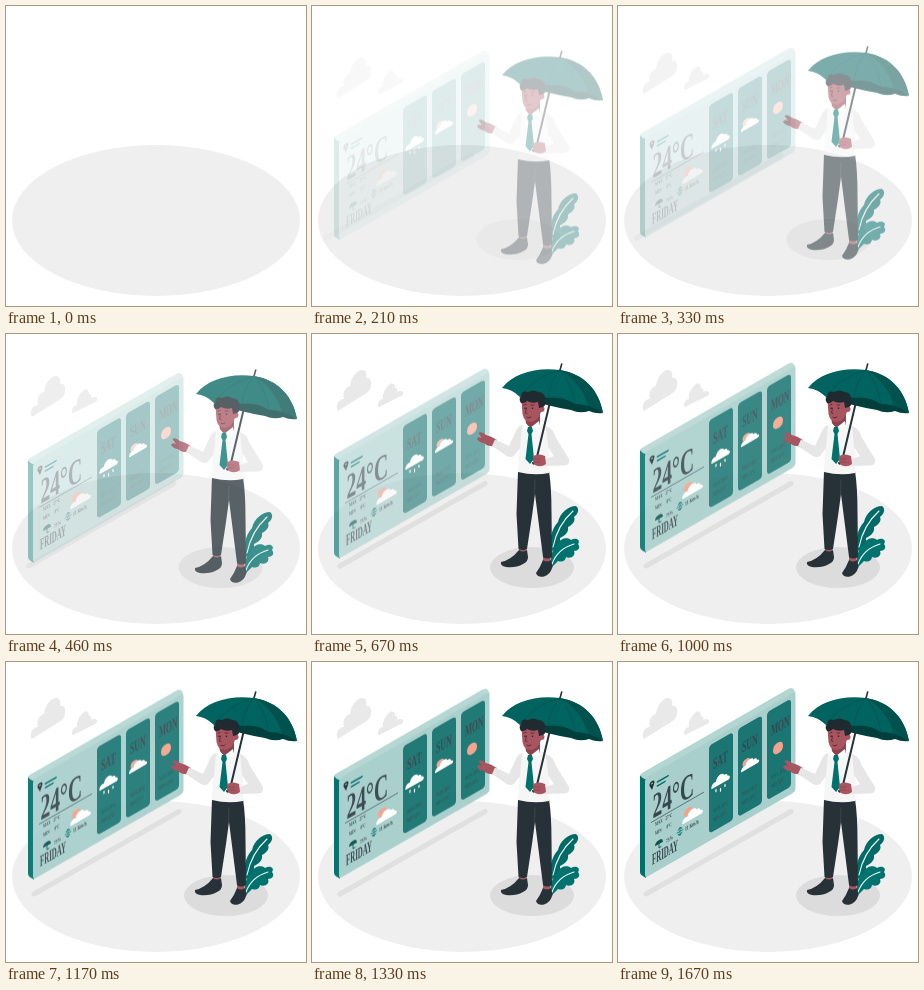
These frames come from a looping animation (300 px wide and 300 px high, 1710 ms). An HTML page:

```html
<!DOCTYPE html>
<html lang="en">
<head>
<meta charset="utf-8">
<title>Weather board</title>
<style>
  html, body { margin: 0; width: 100%; height: 100%; overflow: hidden; background: #fff; }
  svg { display: block; width: 100vw; height: 100vh; }
  text { font-family: "Liberation Serif", serif; font-weight: 700; fill: #37474f; }
  .line { fill: none; stroke-linecap: round; stroke-linejoin: round; }
</style>
</head>
<body>
<svg viewBox="0 0 300 300">
  <defs>
    <path id="cloud" d="M-10 5C-11 1-7-1-5 0C-4-6 3-6 4-2C7-3 8 0 8 1C11 1 11 5 9 5Z"/>
  </defs>

  <ellipse cx="150" cy="214.500" rx="144" ry="75.500" fill="#efefef"/>

  <g id="shadows">
    <path class="line" d="M28 232L173 149.500" stroke="#e0e0e0" stroke-width="5"/>
    <ellipse cx="220" cy="233.500" rx="42" ry="20.500" fill="#dcdcdc"/>
  </g>

  <g id="clouds" fill="#e9e9e9">
    <path d="M25 76C24 70 27 65 32 65C30 58 34 53 38 52C39 43 45 36 50 36C54 36 55 40 54 44C58 43 60 47 59 51C59 55 57 58 53 60L29 75Q26 78 25 76Z"/>
    <path d="M66 72C66 68 68 65 71 65C70 59 74 53 78 50C81 48 83 51 83 54C85 54 86 56 85 58C89 56 92 57 91 61L69 72Q67 74 66 72Z"/>
  </g>

  <g id="board">
    <path d="M22 114Q22 112 24 111L171 26.500Q174 25 176 27.500L177.500 31L28 118Z" fill="#b4d6d3"/>
    <path d="M22 113.500Q24 116 28 117.500L28 216L24 213.500Q22 212.500 22 210Z" fill="#006f6a"/>
    <g transform="matrix(1 -.575 0 1 27 116)">
      <rect width="150.500" height="100" rx="3" fill="#a8cfcc"/>
      <circle cx="7" cy="9.500" r="1.700" fill="none" stroke="#263238" stroke-width="1.700"/>
      <path d="M4.800 11L7 16L9.200 11Z" fill="#263238"/>
      <path class="line" d="M12.500 11H23M12.500 15H20" stroke="#006f6a" stroke-width="1.700"/>
      <path d="M6 48H59" stroke="#37474f" stroke-width=".6"/>
      <g id="labels"></g>
      <circle cx="43.500" cy="59" r="4.500" fill="#f4a28c"/>
      <use href="#cloud" transform="translate(47.500 63)" fill="#fff"/>
      <path d="M10 74Q10 70 14 70Q18 70 18 74Z" fill="#0d5552"/>
      <path class="line" d="M14 73V77.500Q15 79 16 77.500" stroke="#0d5552" stroke-width=".9"/>
      <path class="line" d="M32 73.500H38M35 70V77M33 71.500L35 69.500L37 71.500M33 75.500L35 77.500L37 75.500" stroke="#006f6a" stroke-width=".8"/>
      <g id="days"></g>
      <use href="#cloud" transform="translate(75.500 44.500) scale(.9 1)" fill="#fff"/>
      <path class="line" d="M71 52.500V54.500M75.500 54V56.500M80 52.500V54.500" stroke="#fff" stroke-width="1.200"/>
      <circle cx="101.500" cy="43" r="4" fill="#f4a28c"/>
      <use href="#cloud" transform="translate(105 45.500) scale(.88 .85)" fill="#fff"/>
      <ellipse cx="133" cy="46.500" rx="5" ry="5.500" fill="#f4a28c"/>
    </g>
  </g>

  <g id="person">
    <!-- umbrella -->
    <path class="line" d="M249.700 30L247.500 38" stroke="#263238" stroke-width="1.600"/>
    <path d="M190 54C202 39 224 33 248 36C272 40 287 56 291 79Q284 75 277 77Q269 71 259 74Q248 66 235 68Q222 60 208 63Q200 55 190 54Z" fill="#00635f"/>
    <path d="M248 36C272 40 287 56 291 79Q284 75 277 77Q272 50 248 36Z" fill="#00524e"/>
    <path d="M208 63Q222 59 236 64Q250 62 263 70Q277 70 291 79Q284 80 277 77Q268 80 259 76Q247 74 235 71Q220 66 208 63Z" fill="#003f3c"/>
    <path class="line" d="M248 36Q221 43 208 63M248 36Q238 47 236 64M248 36Q260 49 263 70" stroke="#00524e" stroke-width=".7"/>
    <!-- plant -->
    <path d="M240 217C237 206 239 196 246 188C248 179 256 172 264 172C268 175 266 180 262 183C264 187 260 191 256 193C257 199 252 202 248 204C249 210 245 214 240 217Z" fill="#006b67"/>
    <path d="M239 234C238 223 240 214 246 210C248 204 256 203 259 206C264 203 269 206 266 210C269 214 266 217 262 217C264 222 259 225 254 223C253 228 249 228 246 227Z" fill="#00736e"/>
    <path class="line" d="M241 213C244 198 251 186 261 177M240 230C244 219 252 213 262 210" stroke="#f2f7f7" stroke-width="1.100"/>
    <!-- legs -->
    <path d="M207 210H215L214 220L207 219ZM231 220H239L238 231L231 230Z" fill="#a85560"/>
    <path d="M207 216Q211 219 215 216L216 223Q216 228 211 230Q204 234 194 233Q188 232 189 228Q199 226 207 216Z" fill="#263238"/>
    <path d="M231 226Q235 229 239 226L240.500 233Q238 241 232 242.500Q225 243.500 224 239Q228 234 231 226Z" fill="#263238"/>
    <path d="M206 137H237Q239.500 153 239.500 178L240 223Q235 226 231 223L223 160L220 182L215 215Q211 217 206.500 215L204.500 180Z" fill="#263238"/>
    <path class="line" d="M222.500 160L223 146" stroke="#48565c" stroke-width=".6"/>
    <!-- pointing hand -->
    <path d="M184 112Q176 113 172 109Q168 109 165 105Q166 102 170 104L166.500 99Q169 97 174 101Q179 102 185 106Z" fill="#a85560"/>
    <!-- shirt -->
    <path d="M211 90L226 88L235 92Q238 104 237 116V139Q222 142 206 138L207 117L205 98Q207 92 211 90Z" fill="#f6f6f6"/>
    <path d="M210 91Q206 92 204 97L197 112L183 105.500L180 112L195 122Q199 124 202 122L208 114Z" fill="#e6e6e6"/>
    <path d="M234 92Q241 94 243.500 103L257 125Q258 131 252 131.500L232 132L231 126L242 122L236 113Z" fill="#e6e6e6"/>
    <!-- head -->
    <path d="M213 80L228 77V91Q221 96 214 91Z" fill="#8d434d"/>
    <path d="M209.500 66Q219 60 228 66L229 78Q226 87 219 88Q212 88 210.500 80Z" fill="#a85560"/>
    <circle cx="229.500" cy="75" r="3" fill="#a85560"/>
    <path d="M209 69Q206 65 209.500 62Q209 56 216 58Q222 55 226 58Q233 58 233 65Q235 71 231 73L227 74L226 68Q220 70 215 67Q212 70 209 69Z" fill="#1f2b30"/>
    <path class="line" d="M212 71L214 70.500M219 71H222M214.500 74L213.500 79L215 79.500M215 83.500Q217 84.500 219 83" stroke="#4b2529" stroke-width=".8"/>
    <path d="M213 73.500V75M220.500 73.500V75" stroke="#1f2b30" stroke-width="1.300"/>
    <!-- collar and tie -->
    <path d="M213 88L218 94L227 87L228 92L221 97L218 94L214 97L212 91Z" fill="#fff"/>
    <path d="M216 93H220L221 97L219.500 100L222 125L218 130L213.500 125L216.500 100L215 97Z" fill="#00716c"/>
    <!-- handle and hand -->
    <path class="line" d="M238 68L224 127Q222 131 221 129" stroke="#263238" stroke-width="2"/>
    <path d="M221 122Q227 119 233 122L234 130Q229 134 223 131Q220 128 221 122Z" fill="#a85560"/>
    <path class="line" d="M222 125H228M222 128H228" stroke="#7f4043" stroke-width=".6"/>
  </g>
</svg>
<script>
const LOOP = 1710;
const NS = "http://www.w3.org/2000/svg";
const $ = id => document.getElementById(id);

function add(parent, tag, attrs, label = "") {
  const el = document.createElementNS(NS, tag);
  for (const k in attrs) el.setAttribute(k, attrs[k]);
  el.textContent = label;
  parent.append(el);
  return el;
}

// Condensed lettering on the board plane
function write(parent, label, x, y, size, narrow) {
  return add(parent, "text", {
    transform: `translate(${x} ${y}) scale(${narrow} 1)`, "font-size": size
  }, label);
}

const labels = $("labels");
write(labels, "24°C", 7.5, 45, 35, .56);
write(labels, "MAX", 10, 54, 5.5, .58);
write(labels, "27°C", 20.5, 54, 5.5, .58);
write(labels, "MIN", 10, 63, 5.5, .58);
write(labels, "8°C", 21.5, 63, 5.5, .58);
write(labels, "75%", 21, 77, 5.5, .66);
write(labels, "11 Km/h", 40, 76, 6, .62);
write(labels, "FRIDAY", 7, 91, 16, .43);

const days = $("days");
["SAT", "SUN", "MON"].forEach((day, i) => {
  const x = 64 + 29 * i;
  add(days, "rect", { x, y: 4.5, width: 24, height: 88, rx: 3.5, fill: "#1b7673" });
  write(days, day, x + 4, 30.5, 16, i < 2 ? .49 : .47);
  ["MAX 20°C", "MIN 11°C"].forEach((row, j) =>
    write(days, row, x + 4, 74 + 9 * j, 6, .52).setAttribute("opacity", .75));
});

// rows: [ms, opacity, x, y]
function play(id, rows) {
  const frames = rows.map(([ms, opacity, x, y]) => ({
    offset: ms / LOOP, opacity, transform: `translate(${x}px, ${y}px)`
  }));
  $(id).animate(frames, { duration: LOOP, iterations: Infinity });
}

const rise = [[0, 0, 0, 21], [79, 0, 0, 20], [80, .09, 0, 20], [210, .31, 0, 15.3],
  [460, .75, 0, 6], [620, 1, 0, 0], [LOOP, 1, 0, 0]];
play("person", rise);
play("clouds", rise);
play("shadows", rise.map(([ms, o, x, y]) => [ms, o, -y * .9, 0]));
play("board", [[0, 0, 0, 20], [79, 0, 0, 20], [80, .04, 0, 20], [210, .14, 0, 18.3],
  [460, .4, 0, 13], [670, .62, 0, 8.7], [1000, .87, 0, 2.7], [1330, .97, 0, .7],
  [1670, 1, 0, 0], [LOOP, 1, 0, 0]]);
</script>
</body>
</html>
```
